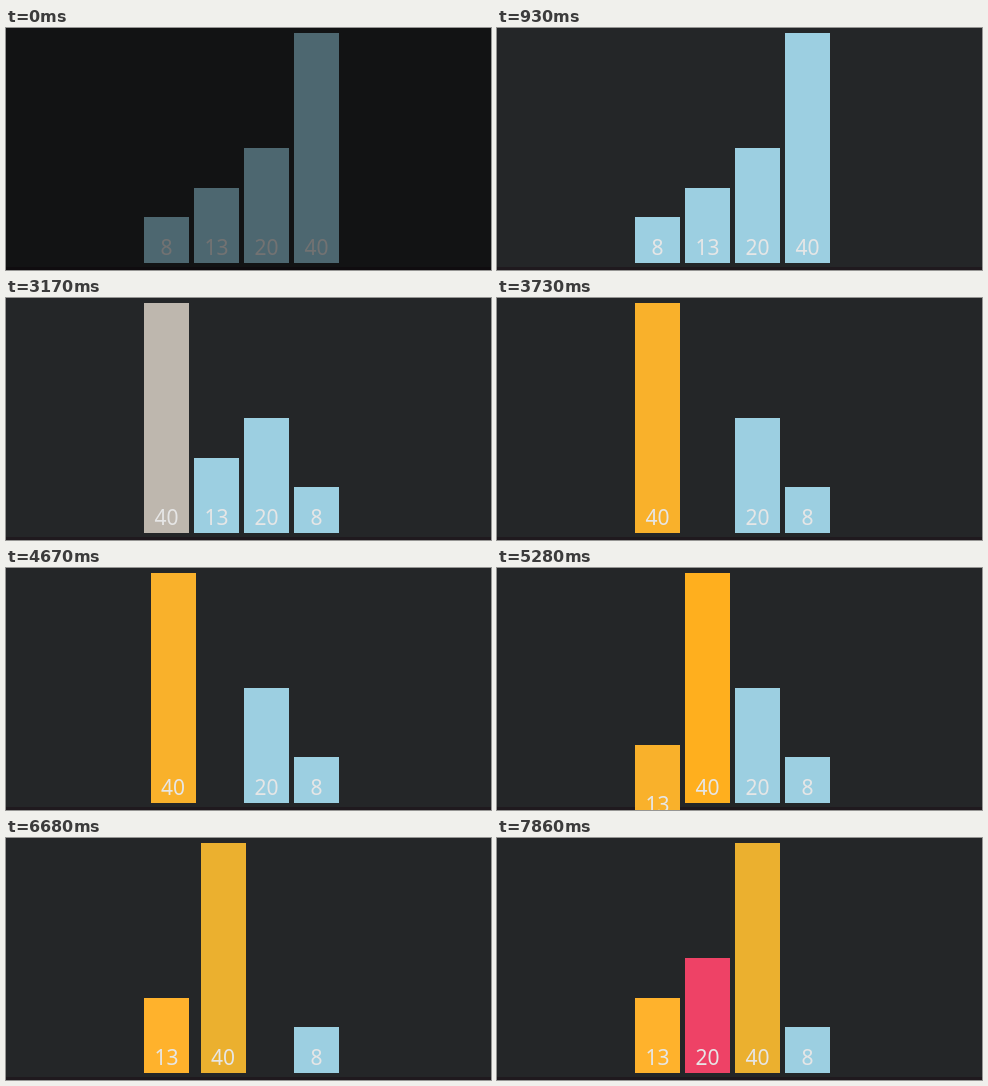
An HTML page for the animation above (8000 ms loop, 485x242 px).

```html
<!DOCTYPE html>
<html lang="en">
<head>
<meta charset="utf-8">
<title>Sorting bars</title>
<style>
  html, body { margin: 0; width: 100%; height: 100%; overflow: hidden; background: #242628; }
  #stage { position: relative; width: 485px; height: 242px; overflow: hidden; }
  .floor { position: absolute; left: 0; top: 239px; width: 485px; height: 3px; background: #1f191e; }
  .bar { position: absolute; left: 0; width: 45px; }
  .bar span {
    position: absolute; left: 0; right: 0; bottom: 4px;
    font: 500 21px/24px "Noto Sans", "Open Sans", sans-serif;
    text-align: center; color: #e6e6e6;
  }
  .shade { position: absolute; inset: 0; background: #000; }
</style>
</head>
<body>
<div id="stage"><div class="floor"></div></div>
<script>
const LOOP = 8000, UNIT = 5.75, BASE = 235, BELOW = 240;
const BLUE = '#9ccfe1', GREY = '#beb7ae', AMBER = '#f9b12b',
      ORANGE = '#ffaf1e', GOLD = '#ffb22c', OCHRE = '#ebb02f', PINK = '#ee4266';
const stage = document.getElementById('stage');
const slot = i => 138 + 50 * i;

function add(className) {
  const el = document.createElement('div');
  el.className = className;
  return stage.appendChild(el);
}

// Each step is [time, changed values]; values hold until the next step.
function play(el, steps, toStyle) {
  let state = {};
  const frames = steps.map(([time, change]) => {
    state = { ...state, ...change };
    return { ...toStyle(state), offset: time / LOOP, easing: 'step-end' };
  });
  frames.push({ ...toStyle(state), offset: 1 });
  el.animate(frames, { duration: LOOP, iterations: Infinity });
}

function slide(start, from, to) {
  return [[0, .13], [80, .68], [150, .95], [220, 1]].map(([dt, part]) =>
    [start + dt, { x: slot(from) + (slot(to) - slot(from)) * part }]);
}

function bar(value, index, steps) {
  const el = add('bar'), height = value * UNIT;
  el.style.height = height + 'px';
  el.style.top = BASE - height + 'px';
  const label = document.createElement('span');
  label.textContent = value;
  el.append(label);
  play(el, [[0, { x: slot(index), y: 0, color: BLUE }], ...steps], s => ({
    transform: `translate(${s.x}px, ${s.y}px)`,
    backgroundColor: s.color
  }));
}

bar(13, 1, [
  [3660, { y: 32 }],
  [3730, { y: BELOW }],
  [4880, { x: slot(0), color: AMBER }],
  [5280, { y: 17 }],
  [5360, { y: 2 }],
  [5430, { y: 0, color: GOLD }]
]);

bar(20, 2, [
  [5660, { y: 32 }],
  [5750, { y: BELOW }],
  [6910, { x: slot(1), color: PINK }],
  [7780, { y: 30 }],
  [7860, { y: 0 }]
]);

bar(40, 3, [
  ...slide(1690, 3, 0),
  [3170, { color: GREY }],
  [3260, { color: AMBER }],
  ...slide(4670, 0, 1),
  [4890, { color: ORANGE }],
  [6210, { color: OCHRE }],
  ...slide(6680, 1, 2)
]);

bar(8, 0, slide(1690, 0, 3));

play(add('shade'), [
  [0, { opacity: .5 }],
  [840, { opacity: .2 }],
  [930, { opacity: 0 }]
], s => s);
</script>
</body>
</html>
```
